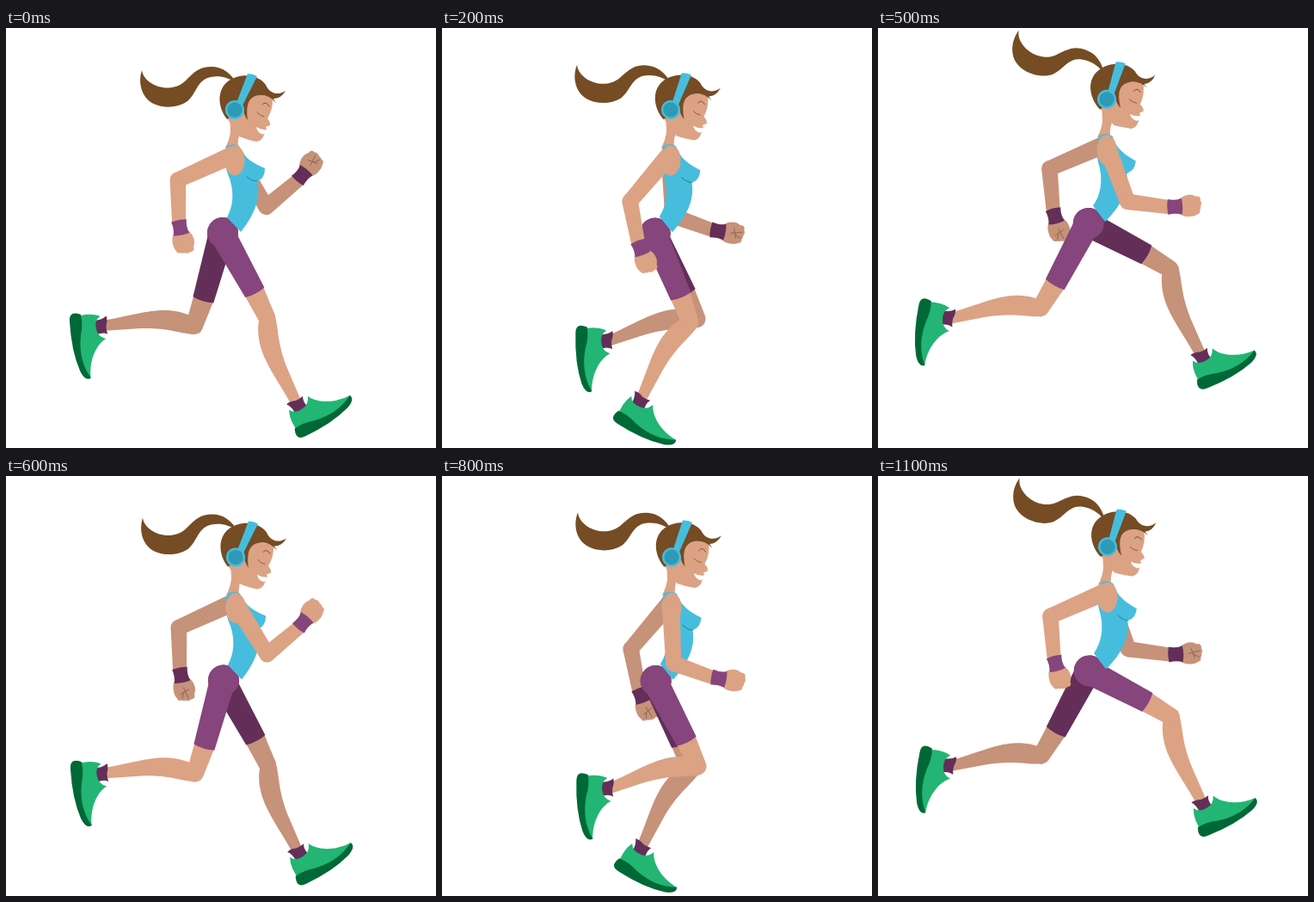
Animation of 500x488 px, one loop 1.2 s. Source, as an HTML page:

```html
<!DOCTYPE html>
<html lang="en">
<head>
<meta charset="utf-8">
<title>Runner</title>
<style>
  html, body { margin: 0; width: 100%; height: 100%; overflow: hidden; background: #fff; }
  svg { display: block; width: 100%; height: 100%; }
</style>
</head>
<body>
<svg id="stage" viewBox="0 0 500 488"></svg>
<script>
const STEP = 100, STRIDE = 6, STEPS = 2 * STRIDE;
const SKY = '#47bddd', HAIR = '#754c24', SOCK = '#632f58';
const NEAR = { skin: '#dca284', cloth: '#86457c' };
const FAR = { skin: '#c69279', cloth: '#632f58', crease: '#8f6350' };

// Each stride has four key poses: contact, squat, push-off and flight.
const KEYS = [0, 1, 3, 5];
const linear = k => k, easeOut = k => k * (2 - k);

function track(ease, ...values) {
  const period = values.length / KEYS.length * STRIDE;
  const time = k => STRIDE * Math.floor(k / KEYS.length) + KEYS[k % KEYS.length];
  return t => {
    t %= period;
    let k = values.length - 1;
    while (time(k) > t) k--;
    const from = values[k], to = values[(k + 1) % values.length];
    return from + (to - from) * ease((t - time(k)) / (time(k + 1) - time(k)));
  };
}

// Limb directions in degrees: 0 points forward, 90 points down
const thigh = track(linear, 62.5, 38.4, 98.6, 119.6, 107, 98, 29.6, 29.2);
const shin = track(linear, 70.7, 110.4, 134.6, 173.3, 180, 207, 125, 70.2);
const foot = track(linear, -32, 0, 52, 95, 80, 125, 45, -28);
const upperArm = track(linear, 155.6, 166.4, 94.4, 69.4, 58.3, 67.1, 107.7, 156.5);
const foreArm = track(linear, 88.7, 127, 31, 7.6, -40, -5.6, 45, 85);
const hipHeight = track(easeOut, 238, 273.5, 227, 227);
const tailSwing = track(linear, 0, 20, -7, 25);

const path = (d, fill) => `<path d="${d}" fill="${fill}"/>`;
const line = (d, color, w = 1) =>
  `<path d="${d}" fill="none" stroke="${color}" stroke-width="${w}" stroke-linecap="round"/>`;
const disc = (r, fill, x = 0, y = 0) => `<circle cx="${x}" cy="${y}" r="${r}" fill="${fill}"/>`;
const group = (transform, ...parts) => `<g transform="${transform}">${parts.join('')}</g>`;
const place = (x, y, turn, ...parts) => group(`translate(${x} ${y}) rotate(${turn})`, ...parts);

const shoe =
  path('M-11 -4 Q-6 -5 0 -2 Q5 -1 10 -2 Q6 4 9 13 L-8 12 Q-7 2 -11 -4Z', SOCK) +
  place(2, 0, 0,
    path('M-14 3 Q-10 11 0 10 Q9 10 13 1 C18 14 36 25 55 26 L50 34 L-18 34 Q-21 15 -14 3Z', '#22b573'),
    path('M-20 25 Q-8 24 4 29 Q32 37 55 26 Q58 33 45 37 Q20 43 -14 39 Q-27 38 -20 25Z', '#006837'));

const SHIN = 104.5;
const calf = 'M0 -10 C21 -8 31 -2 63 -3 L107 -6 V6 C73 12 52 19 31 18 C16 17 5 13 0 9Z';

function leg(t, { skin, cloth }) {
  const a = thigh(t), b = shin(t);
  const length = 113 - 5 * Math.max(0, Math.cos(a * Math.PI / 180));
  const hem = length - 32;
  return place(0, 0, a,
    place(length, 0, b - a, path(calf, skin), disc(10, skin),
      place(SHIN, 0, foot(t) - b, shoe)),
    path(`M${hem - 3} 11 L${length} 10 V-10 L${hem - 3} -13Z`, skin),
    disc(18, cloth),
    path(`M0 16 L${hem} 11.4 Q${hem + 3} -1 ${hem} -13.6 L0 -14Z`, cloth));
}

function hand({ skin, cloth, crease }) {
  const knuckles = [0, 1, 2, 3].map(n => disc(4, skin, 35 - Math.abs(n - 1), 4.3 * n - 7)).join('');
  return path('M13 -8 Q19 -14 28 -13 Q37 -11 37 0 Q37 11 28 12 Q17 13 13 8Z', skin) + knuckles +
    (crease ? line('M23 0 L36 -3 M26 -6 L30 5 M28 1 L35 4', crease, .9) : '') +
    path('M0 -9 Q9 -6.5 16 -9.5 Q18 0 16 9.5 Q8 7 0 9 Q-2 0 0 -9Z', cloth);
}

const UPPER_ARM = 71.5, FOREARM = 47.5;

function arm(t, tone) {
  const a = upperArm(t), b = foreArm(t), { skin } = tone;
  return `<ellipse cx="1" cy="1" rx="11.5" ry="17.5" fill="${skin}"/>` +
    place(0, -6, a,
      path(`M0 10.5 L${UPPER_ARM} 9 V-9 L0 -10.5Z`, skin),
      place(UPPER_ARM, 0, b - a, disc(9.3, skin),
        path(`M0 9.3 L${FOREARM + 2} 8 V-8 L0 -9.3Z`, skin),
        place(FOREARM, 0, -10, hand(tone))));
}

const neck = path('M260 100 L261 120 Q260 130 255 139 L264 146 L270 139 Q269 130 272 122 L275 105Z', NEAR.skin);

const tank =
  path('M256 138 Q263 133 271 137 C276 151 289 158 301 163 C301 171 298 176 292 178 ' +
    'C297 197 289 217 273 237 L257 220 C266 204 264 187 260 175 C255 163 253 152 256 138Z', SKY) +
  line('M280 173 Q286 178 292 178', '#2a93b2', 1.2);

const tail = path('M158 49 C160 66 190 78 208 62 C220 50 225 45 239 45 C252 45 262 53 268 64 ' +
  'C258 57 248 55 238 57 C222 60 222 76 211 85 C197 95 172 94 162 80 C155 70 155 58 158 49Z', HAIR);

const face =
  path('M262 84 L283 76 L310 80 Q311 94 304 105 Q308 110 307 113 L302 115 L303 118 ' +
    'Q301 121 300 124 Q298 131 291 132 Q281 130 271 126 L258 106Z', NEAR.skin) +
  path('M257 106 C246 92 245 72 258 62 C271 52 293 53 302 66 C306 76 316 79 325 73 ' +
    'Q320 82 311 82 L314 87 Q306 77 294 78 C281 80 279 90 281 107 Q276 101 276 92 L266 100Z', HAIR) +
  line('M298 89 Q302 84 306 91', HAIR, .9) +
  line('M292 98 Q295 102 300 103', '#8a5a3c', .9) +
  path('M291 115 Q297 119 303 118 Q301 125 297 123 Q292 121 291 115Z', '#fff');

const phones =
  path('M281 53 Q287 53 292 56 L275 90 L268 87Z', SKY) +
  disc(11, SKY, 266, 95) + disc(8.7, '#2f9ab7', 266, 95);

function runner(t) {
  const s = t % STRIDE, far = t + STRIDE;
  const lean = Math.min(6, 1.8 * s);
  const tilt = -Math.min(6, Math.max(0, 3 * s - 3));
  const hipX = 252 - 1.2 * lean, hipY = hipHeight(s);
  const chestX = 265, chestY = hipY - 85 - .2 * lean;
  return group(t < STRIDE ? '' : 'translate(1 -.6)',
    place(chestX, chestY, 0, arm(far, FAR)),
    place(hipX, hipY, 0, leg(far, FAR), leg(t, NEAR)),
    group(`translate(0 ${chestY - 153})`,
      neck,
      group(`rotate(${lean} 265 153)`, tank),
      group(`rotate(${tilt} 266 95)`,
        group(`rotate(${tailSwing(s)} 265 60)`, tail), face, phones)),
    place(chestX, chestY, 0, arm(t, NEAR)));
}

const stage = document.getElementById('stage');
const start = performance.now();
let shown = -1;

function draw() {
  const step = Math.floor((performance.now() - start) / STEP) % STEPS;
  if (step !== shown) stage.innerHTML = runner(shown = step);
  requestAnimationFrame(draw);
}
draw();
</script>
</body>
</html>
```
